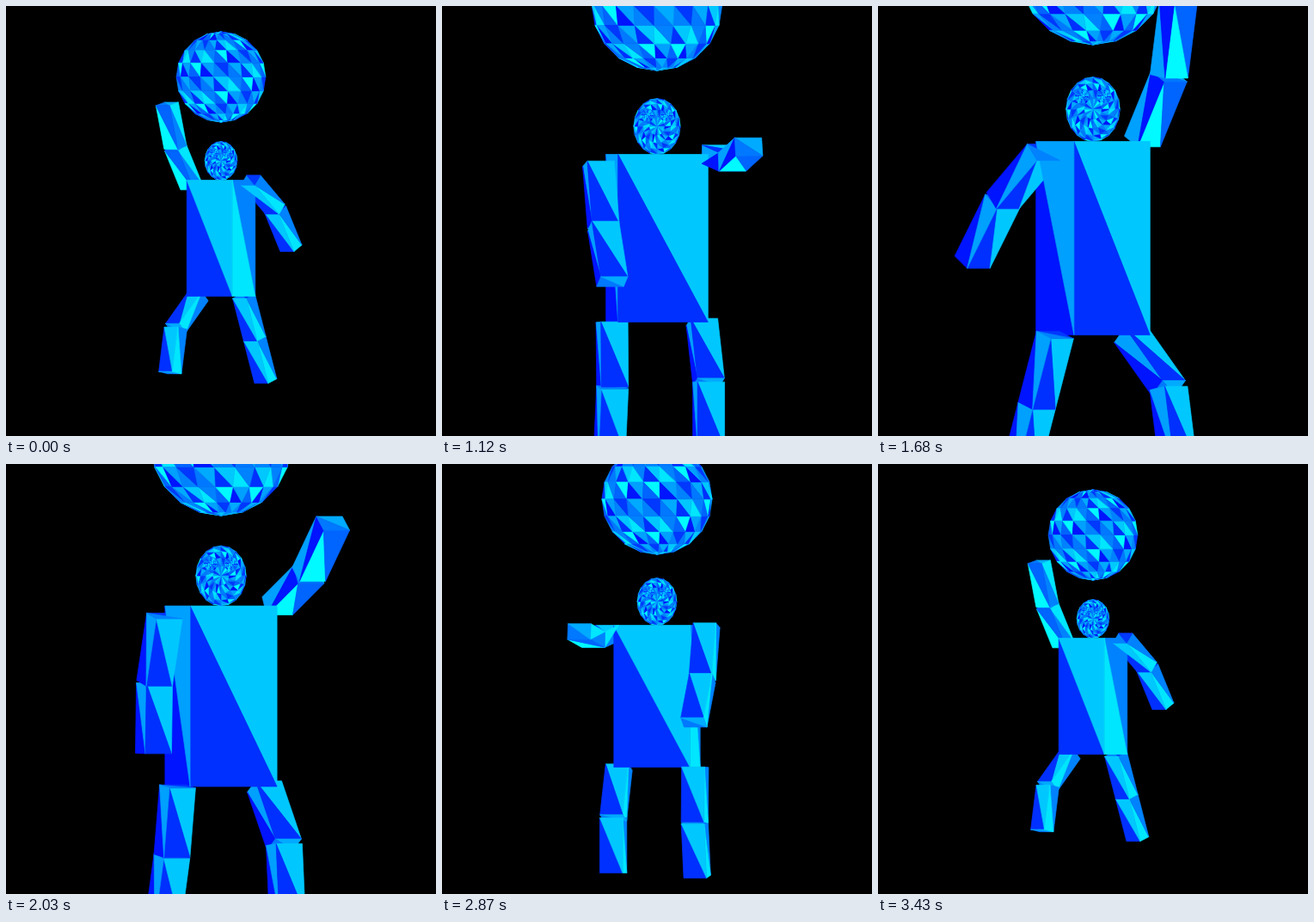
These frames come from a looping animation (500 by 500 pixels, 3.5 s). An HTML page with a canvas:

```html
<!DOCTYPE html>
<html lang="en">
<head>
<meta charset="utf-8">
<title>Dancing figure</title>
<style>
html, body { margin: 0; width: 100%; height: 100%; overflow: hidden; background: #000; }
canvas { display: block; }
</style>
</head>
<body>
<canvas id="stage" width="500" height="500"></canvas>
<script>
const ctx = document.getElementById('stage').getContext('2d');
const STEP = 70, STEPS = 50, LAST = 24;
const RAD = Math.PI / 180;

// Green channel per triangle: front, right, back, left, top, bottom
const GREENS = [48, 200, 230, 130, 100, 250, 20, 160, 130, 56, 120, 170];
const paint = i => `rgb(0,${GREENS[i % GREENS.length]},255)`;

// Each face: outward normal, its right and its down direction
const FACES = [
  [[0, 0, 1], [1, 0, 0], [0, 1, 0]],
  [[1, 0, 0], [0, 0, -1], [0, 1, 0]],
  [[0, 0, -1], [-1, 0, 0], [0, 1, 0]],
  [[-1, 0, 0], [0, 0, 1], [0, 1, 0]],
  [[0, -1, 0], [1, 0, 0], [0, 0, 1]],
  [[0, 1, 0], [1, 0, 0], [0, 0, -1]]
];

const rotX = ([x, y, z], deg) => {
  const c = Math.cos(deg * RAD), s = Math.sin(deg * RAD);
  return [x, y * c - z * s, y * s + z * c];
};
const rotY = ([x, y, z], deg) => {
  const c = Math.cos(deg * RAD), s = Math.sin(deg * RAD);
  return [x * c + z * s, y, z * c - x * s];
};
const add = (a, b) => a.map((v, i) => v + b[i]);

let tris, scale;

function addTri(points, color) {
  const p = points.map(([x, y, z]) => [250 + x * scale, 270 + y * scale, z]);
  const [a, b, c] = p;
  const turn = (b[0] - a[0]) * (c[1] - a[1]) - (b[1] - a[1]) * (c[0] - a[0]);
  if (turn > 0.001) tris.push({ p, color, depth: a[2] + b[2] + c[2] });
}

function addQuad(tl, tr, br, bl, i) {
  addTri([tl, br, bl], paint(i));
  addTri([tl, tr, br], paint(i + 1));
}

// Box hanging down from its top centre
function addBox(w, h, d, place) {
  const size = [w / 2, h / 2, d / 2];
  FACES.forEach(([n, u, v], f) => {
    const corner = (su, sv) => place(n.map((e, i) =>
      (e + su * u[i] + sv * v[i]) * size[i] + (i === 1 ? h / 2 : 0)));
    addQuad(corner(-1, -1), corner(1, -1), corner(1, 1), corner(-1, 1), f * 2);
  });
}

function addBall(stacks, slices, place) {
  const at = (i, j) => {
    const a = Math.PI * i / stacks, b = 2 * Math.PI * j / slices;
    return place([Math.sin(a) * Math.sin(b), -Math.cos(a), Math.sin(a) * Math.cos(b)]);
  };
  for (let i = 0; i < stacks; i++)
    for (let j = 0; j < slices; j++)
      addQuad(at(i, j), at(i, j + 1), at(i + 1, j + 1), at(i + 1, j), (i * slices + j) * 2);
}

function addLimb(joint, upper, bend, yaw) {
  const part = (origin, angle) =>
    addBox(37.5, 87.5, 25, p => rotY(add(origin, rotX(p, angle)), yaw));
  part(joint, upper);
  part(add(joint, rotX([0, 87.5, 0], upper)), upper + bend);
}

function addHead() {
  const facing = (center, radii) => p =>
    add(center, rotX(p, 90).map((v, i) => v * radii[i]));
  addBall(10, 20, facing([0, -150, 0], [31.25, 37.5, 31.25]));
  for (const side of [-1, 1])
    addBall(8, 12, facing([side * 13, -165, 26], [8, 8, 8]));
}

function draw(k) {
  const t = k / LAST, yaw = -45 + 90 * t;
  scale = 0.6 + 0.4 * t;
  tris = [];

  addBall(10, 20, p => rotY(add([0, -312.5, 0], p.map(v => v * 87.5)), yaw));
  addHead();
  addBox(125, 225, 62.5, p => rotY(add([0, -112.5, 0], p), yaw));
  addLimb([-81.25, -100, 0], 150 - 200 * t, 15, yaw);
  addLimb([81.25, -112.5, 0], -50 + 200 * t, 20, yaw);
  addLimb([-62.5, 112.5, 0], 45 - 65 * t, -35 * (1 - t), yaw);
  addLimb([62.5, 112.5, 0], -20 + 65 * t, -35 * t, yaw);

  ctx.fillStyle = '#000';
  ctx.fillRect(0, 0, 500, 500);
  ctx.lineWidth = 0.7;
  ctx.lineJoin = 'round';
  tris.sort((a, b) => a.depth - b.depth);
  for (const { p, color } of tris) {
    ctx.beginPath();
    p.forEach(([x, y]) => ctx.lineTo(x, y));
    ctx.closePath();
    ctx.fillStyle = ctx.strokeStyle = color;
    ctx.fill();
    ctx.stroke();
  }
}

let shown = -1;
const start = performance.now();
function tick() {
  const n = Math.floor((performance.now() - start) / STEP) % STEPS;
  const k = n <= LAST ? n : STEPS - 1 - n;
  if (k !== shown) draw(shown = k);
  requestAnimationFrame(tick);
}
tick();
</script>
</body>
</html>
```
